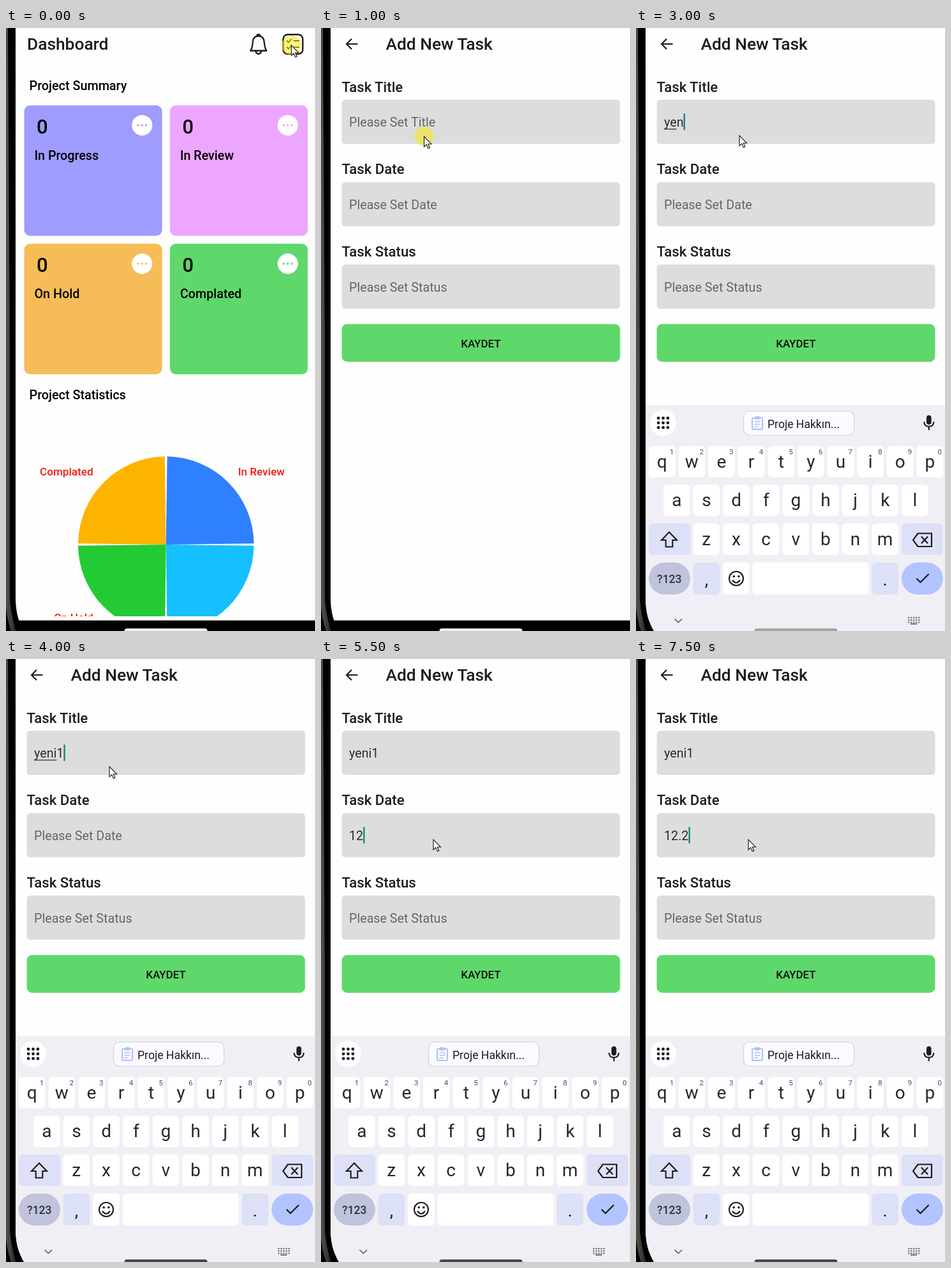
An HTML page for the animation above (8 s loop, 484 by 942 pixels).

```html
<!DOCTYPE html>
<html lang="en">
<head>
<meta charset="utf-8">
<title>Task form</title>
<style>
  html, body { margin: 0; width: 100%; height: 100%; overflow: hidden; background: #000; }
  svg { display: block; width: 484px; height: 942px; }
  text { font-family: Roboto, "Noto Sans", sans-serif; white-space: pre; }
  .line { fill: none; stroke: #1c1c1e; stroke-linecap: round; stroke-linejoin: round; }
</style>
</head>
<body>
<svg id="stage" viewBox="0 0 484 942" xmlns="http://www.w3.org/2000/svg">
  <defs>
    <clipPath id="screen"><path d="M15 0H484V942H28Q15 921 15 890Z"/></clipPath>
    <clipPath id="scroll"><path d="M15 0H484V919H15Z"/></clipPath>
    <linearGradient id="edge">
      <stop offset="0" stop-color="#505050"/>
      <stop offset=".6" stop-color="#3a3a3a"/>
      <stop offset="1" stop-color="#161616"/>
    </linearGradient>
  </defs>
  <rect width="484" height="942"/>
  <path d="M0 0H3L6 500V890Q7 915 16 942H8Q2 925 0 905Z" fill="url(#edge)"/>
  <g clip-path="url(#screen)">
    <rect x="15" width="469" height="925.5" fill="#fefefe"/>
    <g id="dashboard" clip-path="url(#scroll)"></g>
    <g id="list"></g>
    <g id="form"></g>
    <g id="keyboard"></g>
  </g>
  <rect id="pill" x="185.5" y="938" width="130" height="8" rx="4"/>
  <g id="pointer">
    <circle id="glow" r="15" fill="#f5e810" opacity=".55"/>
    <path d="M0 0V16L3.7 12.6L6.3 18.6L8.8 17.5L6.2 11.7H11.4Z" fill="#fff" stroke="#111" stroke-width="1.1"/>
  </g>
</svg>
<script>
const NS = "http://www.w3.org/2000/svg";
const $ = id => document.getElementById(id);
const GREEN = "#5fd86b", INK = "#1c1c1e", TINT = "#dde1f7";

function add(parent, tag, attrs, content) {
  const el = document.createElementNS(NS, tag);
  for (const name in attrs) el.setAttribute(name, attrs[name]);
  if (content !== undefined) el.textContent = content;
  parent.appendChild(el);
  return el;
}
const text = (parent, content, x, y, size, weight = 400, fill = INK, anchor = "start") =>
  add(parent, "text", { x, y, "font-size": size, "font-weight": weight, fill, "text-anchor": anchor }, content);
const box = (parent, x, y, width, height, rx, fill, extra) =>
  add(parent, "rect", { x, y, width, height, rx, fill, ...extra });
const dot = (parent, cx, cy, r, fill) => add(parent, "circle", { cx, cy, r, fill });
const line = (parent, d, width = 2.3, extra) =>
  add(parent, "path", { d, class: "line", "stroke-width": width, ...extra });

function buildDashboard(g) {
  text(g, "Dashboard", 33, 34, 26.3, 500);
  line(g, "M383 35.5C386 31 386 28 386.5 22C387 15 391 12.5 395.5 12.5S404 15 404.5 22C405 28 405 31 408 35.5Z");
  line(g, "M393 11.5Q395.5 8.5 398 11.5M391 36Q392 40.5 395.5 40.5T400 36");
  box(g, 434.2, 10.2, 30.6, 30.4, 7, "none", { stroke: INK, "stroke-width": 2.4 });
  line(g, "M440 20L442.5 22.5L447 17.5M440 30L442.5 32.5L447 27.5M451 20H459M451 30H459", 1.8);
  text(g, "Project Summary", 36.5, 97, 19.8, 500, "#000");
  text(g, "Project Statistics", 36.5, 580, 19.8, 500, "#000");

  const cards = [["In Progress", "#9e9cff"], ["In Review", "#eda6ff"], ["On Hold", "#f6bc57"], ["Complated", GREEN]];
  cards.forEach(([label, color], i) => {
    const x = 28.5 + 228.2 * (i % 2), y = 120.7 + 216.3 * (i >> 1);
    box(g, x, y, 216, 204, 9.5, color);
    text(g, "0", x + 19.5, y + 44, 31, 500, "#000");
    text(g, label, x + 16, y + 85.3, 19.7, 500, "#000");
    dot(g, x + 184.7, y + 31.2, 16, "#fff");
    for (const k of [-1, 0, 1]) dot(g, x + 184.7 + 6.2 * k, y + 31.2, 1.6, color);
  });

  const cx = 250.6, cy = 807, r = 137.7, pad = 0.0135;
  ["#16bfff", "#22cb33", "#fdb400", "#2f80ff"].forEach((fill, i) => {
    const at = a => `${cx + r * Math.cos(a)} ${cy + r * Math.sin(a)}`;
    const start = i * Math.PI / 2 + pad, end = (i + 1) * Math.PI / 2 - pad;
    add(g, "path", { d: `M${cx} ${cy}L${at(start)}A${r} ${r} 0 0 1 ${at(end)}Z`, fill });
  });
  text(g, "Complated", 53, 699, 17.1, 500, "#f41a10");
  text(g, "In Review", 363.5, 699, 17.1, 500, "#f41a10");
  text(g, "On Hold", 75.2, 926.5, 17.1, 500, "#f41a10");
}

function addHeader(g, title) {
  line(g, "M57.5 25H40.5M48 17L40 25L48 33", 2.2, { style: "stroke-linecap:butt;stroke-linejoin:miter" });
  text(g, title, 101.5, 34, 26.3, 500);
}

function buildList(g) {
  addHeader(g, "Task List");
  text(g, "Henüz Görev/Task oluşturulmamıştır...", 250.5, 88, 22, 400, "#7a7a7a", "middle");
  dot(g, 408.3, 847, 48, GREEN);
  line(g, "M395 847.5H421.5M408.3 834V861", 2.8, { style: "stroke-linecap:butt" });
}

function buildForm(g) {
  addHeader(g, "Add New Task");
  const fields = ["Title", "Date", "Status"].map((name, i) => {
    const y = 112 + 128.8 * i;
    text(g, "Task " + name, 32.5, y - 12.5, 22.2, 500);
    box(g, 32.5, y, 436, 69, 5.5, "#dddddd");
    const hint = "Please Set " + name;
    return {
      y, hint,
      label: text(g, hint, 44, y + 42, 19.7),
      underline: box(g, 44, y + 45.3, 0, 1.3, 0, "#333"),
      caret: box(g, 0, y + 21.7, 2.4, 25.5, 0, "#12887c")
    };
  });
  box(g, 32.5, 462.5, 436, 59, 8.5, GREEN);
  text(g, "KAYDET", 250.5, 498.6, 17, 500, "#111", "middle");
  return fields;
}

function buildKeyboard(g) {
  const pitch = 46.63;
  const letters = [];
  box(g, 15, 589, 469, 353, 0, "#f1eff6");

  dot(g, 42.5, 616.8, 20.3, "#fff");
  for (let i = 0; i < 9; i++) dot(g, 35.1 + 7.4 * (i % 3), 609.4 + 7.4 * Math.floor(i / 3), 2.4, INK);
  box(g, 168.5, 598.5, 173, 37.5, 9, "#fbfaff", { stroke: "#d2d3dc", "stroke-width": 1.2 });
  box(g, 182, 609, 16, 18, 2, "none", { stroke: "#b0c0fc", "stroke-width": 2 });
  box(g, 186, 606.5, 8, 5, 1.5, "#b0c0fc");
  line(g, "M186 615H194M186 619H194M186 623H191", 1.5, { style: "stroke:#b0c0fc" });
  text(g, "Proje Hakkın...", 206, 624.5, 17.6);
  box(g, 455, 605, 7.6, 14.5, 3.8, INK);
  line(g, "M451.3 616Q452 622.6 458.8 622.6T466.3 616M458.8 623V627.5", 2.2);

  const rows = [["qwertyuiop", 20, 653], ["asdfghjkl", 43.2, 713.5], ["zxcvbnm", 89.6, 774]];
  for (const [keys, left, y] of rows) {
    [...keys].forEach((key, i) => {
      const x = left + pitch * i;
      box(g, x, y, 41.5, 49, 6, "#fff");
      letters.push({ key, y, el: text(g, key, x + 20.7, y, 28, 400, "#26262c", "middle") });
      if (y === 653) text(g, (i + 1) % 10, x + 36, 666, 11.5, 400, "#4c4c55", "middle");
    });
  }

  box(g, 20, 774, 65, 49, 6, TINT);
  const shift = line(g, "M52 787.5L64 800H57.3V810.5H46.7V800H40Z", 2.1, { style: "stroke-linejoin:miter" });
  box(g, 416, 774, 65, 49, 6, TINT);
  line(g, "M441.5 789.5H463V810H441.5L434 799.8ZM447.5 795L456.5 804.5M456.5 795L447.5 804.5", 2.2);

  box(g, 20, 835, 65, 50, 25, "#bfc4dc");
  text(g, "?123", 52.3, 866.5, 17.5, 500, "#30323c", "middle");
  box(g, 89.6, 835, 41.5, 50, 6, TINT);
  text(g, ",", 110.3, 871, 27, 400, INK, "middle");
  box(g, 136.2, 835, 41.5, 50, 6, "#fff");
  line(g, "M168 860A11 11 0 1 1 146 860A11 11 0 1 1 168 860M151.5 863Q157 870 162.5 863", 2.1);
  dot(g, 153.2, 856.7, 1.8, INK);
  dot(g, 160.8, 856.7, 1.8, INK);
  box(g, 182.5, 835, 182, 50, 6, "#fff");
  box(g, 369.4, 835, 41.5, 50, 6, TINT);
  text(g, ".", 390, 871, 27, 400, INK, "middle");
  box(g, 416, 835, 65, 50, 25, "#b1c4ff");
  line(g, "M440 860.5L445.5 866L458 853.5", 2.2);

  line(g, "M61 923.5L66.3 928.5L71.6 923.5", 1.8, { style: "stroke:#777780" });
  for (let i = 0; i < 15; i++) box(g, 426 + 4 * (i % 5), 920 + 3.7 * Math.floor(i / 5), 2.4, 2.2, 0, "#777780");
  box(g, 430, 930, 10, 2, 0, "#777780");
  return { letters, shift };
}

buildDashboard($("dashboard"));
buildList($("list"));
const fields = buildForm($("form"));
const { letters, shift } = buildKeyboard($("keyboard"));

const STEP = 500;
const titleSpot = [162, 168], dateSpot = [176, 282];
const typeTitle = (title, marked, pill) =>
  ({ screen: "form", at: titleSpot, keys: true, values: [title, ""], marked, caret: 0, pill });
const typeDate = (date, caret = 1) =>
  ({ screen: "form", at: dateSpot, keys: true, values: ["yeni1", date], caret, pill: "#48474a" });

const steps = [
  { screen: "dashboard", at: [447, 27], glow: true },
  { screen: "list", at: [424, 846], glow: true },
  { screen: "form", at: [161.5, 169.5], glow: true },
  { screen: "form", at: titleSpot, keys: true, upper: true },
  typeTitle("y", "", "#cfcdd0"),
  typeTitle("ye", "y", "#cfcdd0"),
  typeTitle("yen", "ye", "#a6a4a8"),
  typeTitle("yeni", "yeni", "#757378"),
  typeTitle("yeni1", "yeni", "#48474a"),
  { ...typeDate("", -1), upper: true },
  typeDate("1"),
  typeDate("12"),
  typeDate("12."),
  typeDate("12.2"),
  typeDate("12.20", -1),
  typeDate("12.2")
];

const show = (el, on) => el.setAttribute("display", on ? "inline" : "none");

function render(time) {
  const s = steps[Math.floor(time / STEP) % steps.length];
  for (const id of ["dashboard", "list", "form"]) show($(id), s.screen === id);
  show($("keyboard"), s.keys);
  show($("glow"), s.glow);
  $("pointer").setAttribute("transform", `translate(${s.at})`);
  $("pill").setAttribute("fill", s.pill || "#f4f4f4");

  fields.forEach((field, i) => {
    const value = s.values?.[i] || "";
    const { label, underline, caret } = field;
    const marked = i === 0 && s.marked || "";
    label.textContent = value || field.hint;
    label.setAttribute("fill", value ? "#2b2b2b" : "#666");
    underline.setAttribute("width", marked ? label.getSubStringLength(0, marked.length) : 0);
    show(caret, s.caret === i);
    if (s.caret === i) caret.setAttribute("x", 44 + label.getComputedTextLength());
  });

  for (const { key, y, el } of letters) {
    el.textContent = s.upper ? key.toUpperCase() : key;
    el.setAttribute("y", y + (s.upper ? 36 : 33.5));
  }
  shift.style.fill = s.upper ? INK : "none";
}

const origin = performance.now();
function tick() {
  render((performance.now() - origin) % (STEP * steps.length));
  requestAnimationFrame(tick);
}
tick();
</script>
</body>
</html>
```
